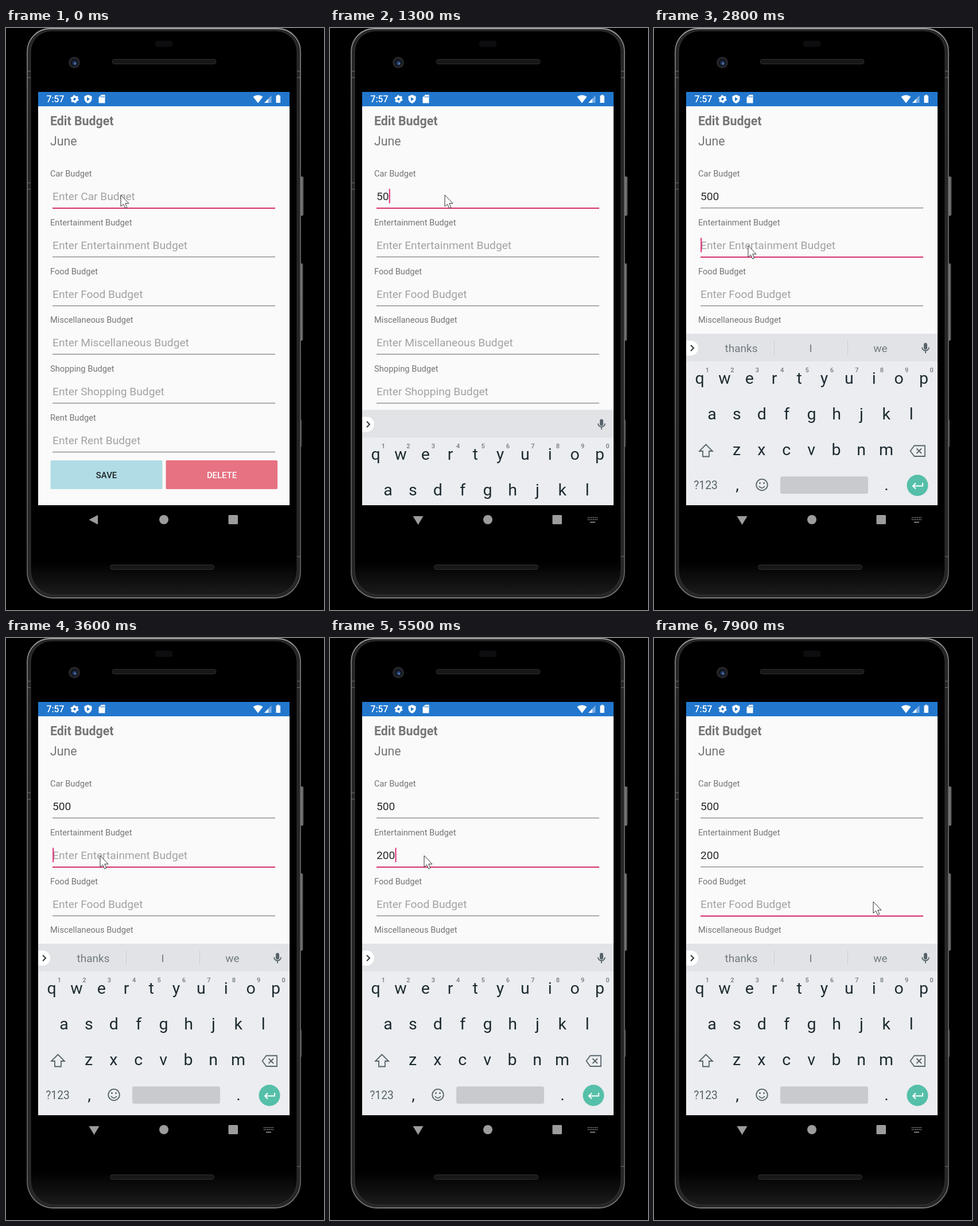
An HTML page for the animation above (8000 ms loop, 554 px wide and 1011 px high).

```html
<!DOCTYPE html>
<html lang="en">
<head>
<meta charset="utf-8">
<title>Edit Budget</title>
<style>
  html, body { margin: 0; width: 100%; height: 100%; overflow: hidden; background: #000; }
  svg { display: block; width: 554px; height: 1011px; font-family: Roboto, sans-serif; }
  .label { font-size: 14.7px; fill: #757575; }
  .value { font-size: 19.18px; }
  .button { font-size: 14.9px; font-weight: 500; text-anchor: middle; }
  .key { font-size: 28.5px; fill: #1d2b31; text-anchor: middle; }
  .digit { font-size: 11px; font-weight: 500; fill: #727b80; text-anchor: middle; }
  .word { font-size: 19px; fill: #737b80; text-anchor: middle; }
  .line { fill: none; stroke: #57646a; stroke-width: 1.8; }
</style>
</head>
<body>
<svg viewBox="0 0 554 1011">
  <defs>
    <linearGradient id="edge" x2="0" y2="1">
      <stop offset="0" stop-color="#a0a0a0"/><stop offset=".04" stop-color="#7c7c7c"/>
      <stop offset=".2" stop-color="#686868"/><stop offset=".94" stop-color="#5c5c5c"/>
      <stop offset="1" stop-color="#7a7a7a"/>
    </linearGradient>
    <linearGradient id="glass" x2="0" y2="1">
      <stop offset="0" stop-color="#000"/><stop offset=".94" stop-color="#000"/>
      <stop offset="1" stop-color="#1b1b1b"/>
    </linearGradient>
    <linearGradient id="side" x2="1" y2="0">
      <stop offset="0" stop-color="#2b2b2b"/><stop offset=".5" stop-color="#808080"/>
      <stop offset="1" stop-color="#444"/>
    </linearGradient>
    <clipPath id="screen"><rect x="56" y="111" width="438" height="718"/></clipPath>
  </defs>

  <rect width="554" height="1011"/>
  <g fill="url(#side)">
    <rect x="511" y="258" width="7.500" height="68" rx="2"/>
    <rect x="511" y="409" width="6.500" height="134" rx="2"/>
    <rect x="511" y="680" width="4" height="48" rx="2"/>
  </g>
  <path d="M37 41a40 40 0 0 1 40-40h396a40 40 0 0 1 40 40v903a46 46 0 0 1-46 46h-384a46 46 0 0 1-46-46z"
    fill="#262626" stroke="url(#edge)" stroke-width="1.800"/>
  <path d="M43 41a36 36 0 0 1 36-36h392a36 36 0 0 1 36 36v902a42 42 0 0 1-42 42h-380a42 42 0 0 1-42-42z"
    fill="url(#glass)" stroke="#353535"/>
  <path d="M37 75h6M37 86h6M507 75h6M507 86h6M37 269h6M37 280h6M507 918h6" stroke="#777"/>
  <g fill="#171717" stroke="#303030">
    <rect x="185" y="54.500" width="181" height="8" rx="4"/>
    <rect x="181.500" y="932.500" width="181" height="8" rx="4"/>
  </g>
  <rect x="260" y="22" width="30" height="11" rx="4" fill="#0d0d0f"/>
  <circle cx="119" cy="60" r="10" fill="#252629"/>
  <circle cx="119" cy="60" r="6.500" fill="#11151f"/>
  <circle cx="119.500" cy="61" r="3.500" fill="#263f6d"/>
  <circle cx="120.500" cy="62" r="1.500" fill="#6685b5"/>

  <rect x="56" y="111" width="438" height="718" fill="#fafafa"/>
  <rect x="56" y="111" width="438" height="25" fill="#2277cd"/>
  <g fill="#fff">
    <text x="70.500" y="129" font-size="15.700" font-weight="500">7:57</text>
    <circle cx="119.500" cy="123.500" r="4" fill="none" stroke="#fff" stroke-width="3.500"/>
    <circle cx="119.500" cy="123.500" r="6.200" fill="none" stroke="#fff" stroke-width="1.800" stroke-dasharray="3.200 3.290"/>
    <path d="M143 116l6.500 2.500v4.500q0 5-6.500 8-6.500-3-6.500-8v-4.500z"/>
    <path d="M141 120v7l5.200-3.500z" fill="#2277cd"/>
    <path d="M166 116h6.500v14.500h-11v-10z"/>
    <path d="M165.500 118v3M168 118v3M170.500 118v3" stroke="#2277cd"/>
    <path d="M430.500 119.500q8.500-6 17 0l-8.500 11z"/>
    <path d="M450 130l12.500-13v13z" opacity=".4"/>
    <path d="M450 130l7-7.300v7.300z"/>
    <path d="M472.500 116h3.500v1.500h2v12.500h-7.500v-12.500h2z"/>
  </g>
  <g fill="#757575" font-size="21.300">
    <text x="77" y="169" font-weight="700">Edit Budget</text>
    <text x="77" y="204">June</text>
  </g>
  <g id="form"></g>
  <rect id="caret" width="2" height="25" fill="#df2d78"/>
  <rect x="77.500" y="751" width="195" height="50" rx="2" fill="#b0dce5"/>
  <rect x="278.500" y="751" width="194.500" height="50" rx="2" fill="#e67282"/>
  <text class="button" x="175" y="781.500" fill="#1c2022">SAVE</text>
  <text class="button" x="376" y="781.500" fill="#fff">DELETE</text>

  <g clip-path="url(#screen)">
    <g id="keyboard">
      <rect x="56" y="531" width="438" height="298" fill="#ebedf0"/>
      <rect x="56" y="531" width="438" height="48" fill="#e1e3e7"/>
      <path d="M56 543h8a13 13 0 0 1 0 26h-8z" fill="#fff"/>
      <path class="line" d="M64 551l5 5-5 5" style="stroke:#30383c;stroke-width:2"/>
      <rect x="470" y="547" width="6" height="11.500" rx="3" fill="#57646a"/>
      <path class="line" d="M467 554.500a6 6 0 0 0 12 0M473 560.500v4.500"/>
      <g id="words">
        <text class="word" x="152" y="563">thanks</text>
        <text class="word" x="273" y="563">I</text>
        <text class="word" x="394.500" y="563">we</text>
        <path d="M209.500 543v25M337.500 543v25" stroke="#c9cdd0"/>
      </g>
      <g id="keys"></g>
      <path class="line" d="M90.500 723.500l-11.500 11.500h6v9.500h11v-9.500h6z"/>
      <path class="line" d="M453.500 725.500h18.500v18.500h-18.500l-7-9.250zM457.500 730.500l8.500 8.500m0-8.500l-8.500 8.500"/>
      <text x="90" y="800.500" font-size="19.300" fill="#57646a" text-anchor="middle">?123</text>
      <circle class="line" cx="188" cy="793.500" r="9.800"/>
      <path class="line" d="M183 796q5 6 10 0"/>
      <circle cx="184.500" cy="790.500" r="1.500" fill="#57646a"/>
      <circle cx="191.500" cy="790.500" r="1.500" fill="#57646a"/>
      <rect x="220" y="779" width="153" height="30" rx="3.500" fill="#c8cace"/>
      <circle cx="459" cy="794.500" r="18.500" fill="#55bfa9"/>
      <path d="M468 790v5.500h-17m5-5l-5 5 5 5" fill="none" stroke="#fff" stroke-width="2"/>
    </g>
  </g>

  <g fill="#9c9c9c">
    <path id="back"/>
    <circle cx="275" cy="854" r="8"/>
    <rect x="387.500" y="846" width="16.500" height="16" rx="1.500"/>
    <g id="ime" stroke="#9c9c9c" stroke-width="1.600">
      <path d="M449 850.500h17M449 854h17" stroke-dasharray="1.700 1.360"/>
      <path d="M453 858.500h9"/>
    </g>
  </g>
  <path id="mouse" d="M0 0V20L4.500 16L7.800 23L10.800 21.700L7.800 14.700H14Z" fill="#fff" stroke="#333" stroke-linejoin="round"/>
</svg>
<script>
const LOOP = 8000, STEP = 100;
const $ = id => document.getElementById(id);
const names = ['Car', 'Entertainment', 'Food', 'Miscellaneous', 'Shopping', 'Rent'];
const offset = i => Math.round(i * 84.75);

// Each entry: time, focused field, its content
const edits = [
  [-600, 0, ''], [1100, 0, '5'], [1300, 0, '50'], [1400, 0, '500'],
  [2600, 1, ''], [5100, 1, '2'], [5300, 1, '20'], [5500, 1, '200'], [7300, 2, '']
];

// Each entry: time, x, y of the pointer tip
const pointer = [
  [0, 200, 290], [1500, 200, 290], [1900, 155, 363], [2300, 164, 378],
  [5700, 164, 378], [6400, 383, 457], [6900, 383, 457], [7100, 382, 458], [LOOP, 382, 458]
];

$('form').innerHTML = names.map((name, i) => `
  <g transform="translate(0 ${offset(i)})">
    <text class="label" x="77" y="258">${name} Budget</text>
    <text class="value" x="81" y="299"></text>
    <rect class="rule" x="81" y="312" width="388"/>
  </g>`).join('');
const values = document.querySelectorAll('.value');
const rules = document.querySelectorAll('.rule');

const row = (letters, x, y) => [...letters].map((c, i) =>
  `<text class="key" x="${x + i * 43.4}" y="${y}">${c}</text>`).join('');
$('keys').innerHTML = row('qwertyuiop', 79.5, 618) + row('asdfghjkl', 101, 680) +
  row('zxcvbnm', 144, 742) + row(',', 145, 803) + row('.', 405, 803) +
  [...'1234567890'].map((d, i) =>
    `<text class="digit" x="${93 + i * 43.4}" y="598">${d}</text>`).join('');

const ease = p => p * p * (3 - 2 * p);

function pointerAt(t) {
  const i = pointer.findIndex(p => p[0] > t);
  const [t0, x0, y0] = pointer[i - 1], [t1, x1, y1] = pointer[i];
  const p = ease((t - t0) / (t1 - t0));
  return [x0 + (x1 - x0) * p, y0 + (y1 - y0) * p];
}

function draw(t) {
  const past = edits.filter(e => e[0] <= t);
  const [since, focus, content] = past[past.length - 1];
  const typed = names.map(() => '');
  past.forEach(([, field, text]) => typed[field] = text);

  names.forEach((name, i) => {
    const active = i === focus;
    values[i].textContent = typed[i] || `Enter ${name} Budget`;
    values[i].setAttribute('fill', typed[i] ? '#2a2a2a' : '#a2a2a2');
    rules[i].setAttribute('height', active ? 2 : 1.2);
    rules[i].setAttribute('fill', active ? '#d5306f' : '#7d7d7d');
  });

  $('caret').setAttribute('x', 81.2 + content.length * 10.77);
  $('caret').setAttribute('y', 279.5 + offset(focus));
  $('caret').style.opacity = (t - since) % 1000 < 500 ? 1 : 0;

  const rise = Math.min(1, Math.max(0, (t - 1200) / 300));
  $('keyboard').setAttribute('transform', `translate(0 ${298 * (1 - rise) ** 2})`);
  $('words').style.opacity = content ? 0 : 1;
  const open = t >= 1100;
  $('back').setAttribute('d', open ? 'M144.500 848h18l-9 15z' : 'M160 846v16.500l-15.500-8.250z');
  $('ime').style.opacity = open ? 1 : 0;
  $('mouse').setAttribute('transform', `translate(${pointerAt(t)})`);
}

function tick(now) {
  draw(Math.floor(now % LOOP / STEP) * STEP);
  requestAnimationFrame(tick);
}
draw(0);
requestAnimationFrame(tick);
</script>
</body>
</html>
```
